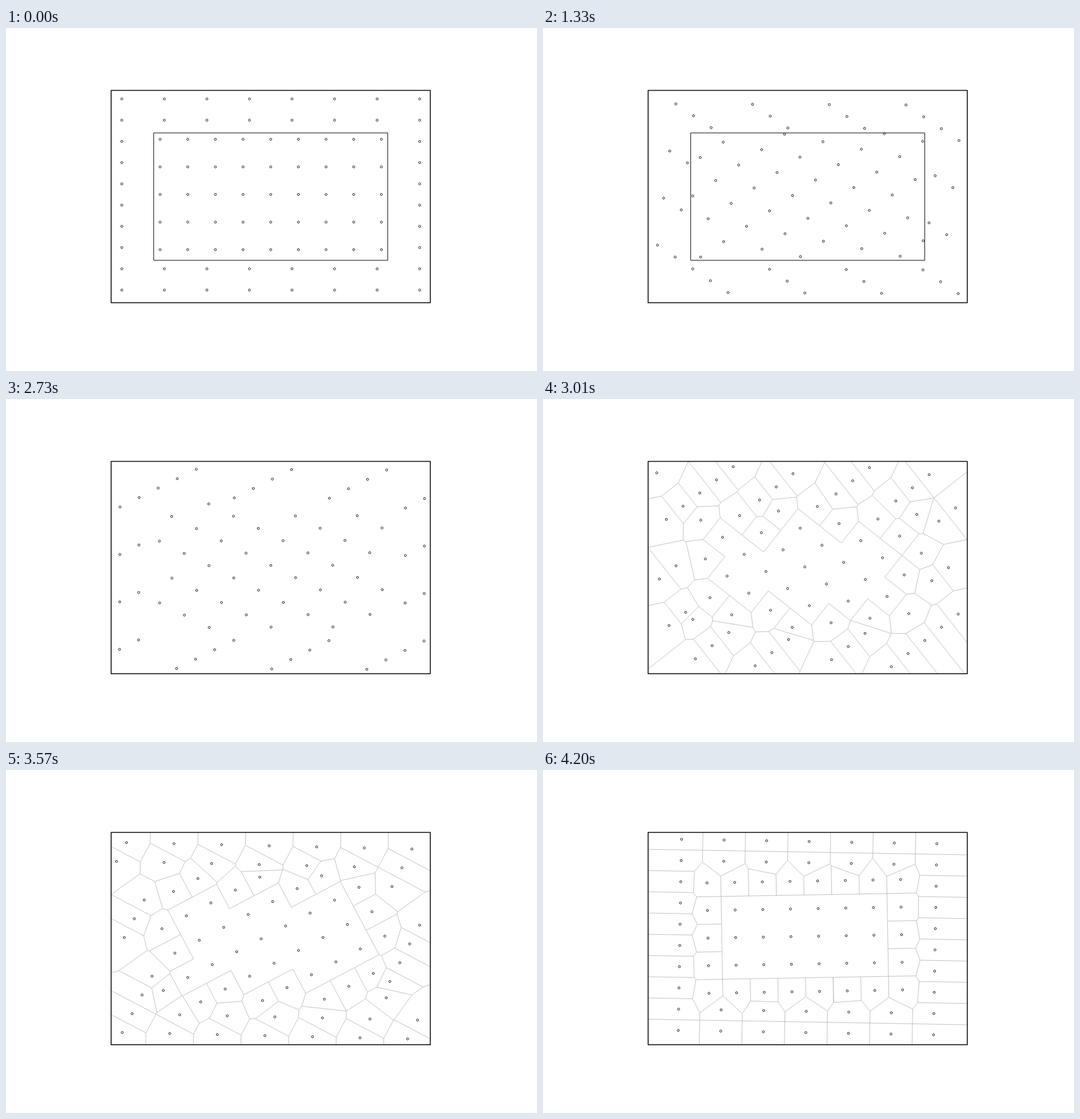
Write an HTML page with a canvas that moves like this. It is 930 by 602 pixels and loops after 4270 ms.

```html
<!DOCTYPE html>
<html lang="en">
<head>
<meta charset="utf-8">
<title>Rotating point grids</title>
<style>
  html, body { margin: 0; width: 100%; height: 100%; overflow: hidden; background: #fff; }
  canvas { display: block; }
</style>
</head>
<body>
<canvas id="stage" width="930" height="602"></canvas>
<script>
const ctx = document.getElementById('stage').getContext('2d');

// Geometry is in grid units; the outer box is 15 x 10.
const UNIT = 37.265, LEFT = 184.16, TOP = 109.6;
const STEP_MS = 70, STEPS = 61;
const HIDE_BOX = 20, SHOW_CELLS = 40;
const INNER = { x: 2, y: 2, w: 11, h: 6 };
const SQUARE = 1.3;

const px = x => LEFT + x * UNIT;
const py = y => TOP + y * UNIT;

function within(p, x, y, w, h) {
  return p[0] >= x && p[0] <= x + w && p[1] >= y && p[1] <= y + h;
}
const inInner = p => within(p, INNER.x, INNER.y, INNER.w, INNER.h);
const inOuter = p => within(p, 0.2, 0.2, 14.6, 9.6) && !inInner(p);

// Grid points turned about a pivot, kept where the test holds.
function grid(pivot, offset, sx, sy, angle, keep) {
  const c = Math.cos(angle), s = Math.sin(angle), out = [];
  for (let i = -12; i <= 12; i++) {
    for (let j = -12; j <= 12; j++) {
      const x = offset[0] + i * sx, y = offset[1] + j * sy;
      const p = [pivot[0] + x * c - y * s, pivot[1] + x * s + y * c];
      if (keep(p)) out.push(p);
    }
  }
  return out;
}

// Part of a polygon that is nearer to p than to q. A vertex is
// [x, y, neighbour], the neighbour across the edge that starts there.
function clip(poly, p, q) {
  const nx = q[0] - p[0], ny = q[1] - p[1];
  const mx = (p[0] + q[0]) / 2, my = (p[1] + q[1]) / 2;
  const side = v => (v[0] - mx) * nx + (v[1] - my) * ny;
  const out = [];
  poly.forEach((a, i) => {
    const b = poly[(i + 1) % poly.length];
    const da = side(a), db = side(b);
    if (da <= 0) out.push(a);
    if ((da < 0 && db > 0) || (da > 0 && db < 0)) {
      const t = da / (da - db);
      out.push([a[0] + (b[0] - a[0]) * t, a[1] + (b[1] - a[1]) * t, da < 0 ? q : a[2]]);
    }
  });
  return out;
}

function cell(p, points) {
  let poly = [[0, 0], [15, 0], [15, 10], [0, 10]];
  for (const q of points) if (q !== p) poly = clip(poly, p, q);
  return poly;
}

function area(poly) {
  let sum = 0;
  poly.forEach((a, i) => {
    const b = poly[(i + 1) % poly.length];
    sum += a[0] * b[1] - b[0] * a[1];
  });
  return Math.abs(sum) / 2;
}

function drawCells(points) {
  const done = new Set();
  ctx.beginPath();
  for (const p of points) {
    const poly = cell(p, points);
    // Cells as large as a full grid square stay undrawn.
    if (Math.abs(area(poly) - SQUARE * SQUARE) < 0.005) continue;
    poly.forEach((a, i) => {
      // Shared edges are drawn once, edges on the box not at all.
      if (!a[2] || done.has(a[2])) return;
      const b = poly[(i + 1) % poly.length];
      ctx.moveTo(px(a[0]), py(a[1]));
      ctx.lineTo(px(b[0]), py(b[1]));
    });
    done.add(p);
  }
  ctx.strokeStyle = '#b0b0b0';
  ctx.lineWidth = 0.8;
  ctx.stroke();
}

function drawBox(x, y, w, h, width) {
  ctx.strokeStyle = '#000';
  ctx.lineWidth = width;
  ctx.strokeRect(px(x), py(y), w * UNIT, h * UNIT);
}

function drawDots(points) {
  ctx.beginPath();
  for (const p of points) {
    const x = px(p[0]), y = py(p[1]);
    ctx.moveTo(x + 1.86, y);
    ctx.arc(x, y, 1.86, 0, 2 * Math.PI);
  }
  ctx.strokeStyle = '#000';
  ctx.lineWidth = 0.9;
  ctx.stroke();
}

function draw(step) {
  const degrees = step * (step < HIDE_BOX ? 2.95 : 179 / 60);
  const angle = degrees * Math.PI / 180;
  const points = [
    ...grid([6, 4.4], [0.5, 0], 2, 1, -angle, inOuter),
    ...grid([7.1, 4.25], [0.4, 0.65], SQUARE, SQUARE, angle, inInner)
  ];
  ctx.fillStyle = '#fff';
  ctx.fillRect(0, 0, 930, 602);
  ctx.lineJoin = 'round';
  if (step >= SHOW_CELLS) drawCells(points);
  if (step < HIDE_BOX) drawBox(INNER.x, INNER.y, INNER.w, INNER.h, 1);
  drawBox(0, 0, 15, 10, 1.5);
  drawDots(points);
}

let shown = -1;
const start = performance.now();

function tick() {
  const step = Math.floor((performance.now() - start) / STEP_MS) % STEPS;
  if (step !== shown) draw(shown = step);
  requestAnimationFrame(tick);
}
tick();
</script>
</body>
</html>
```
